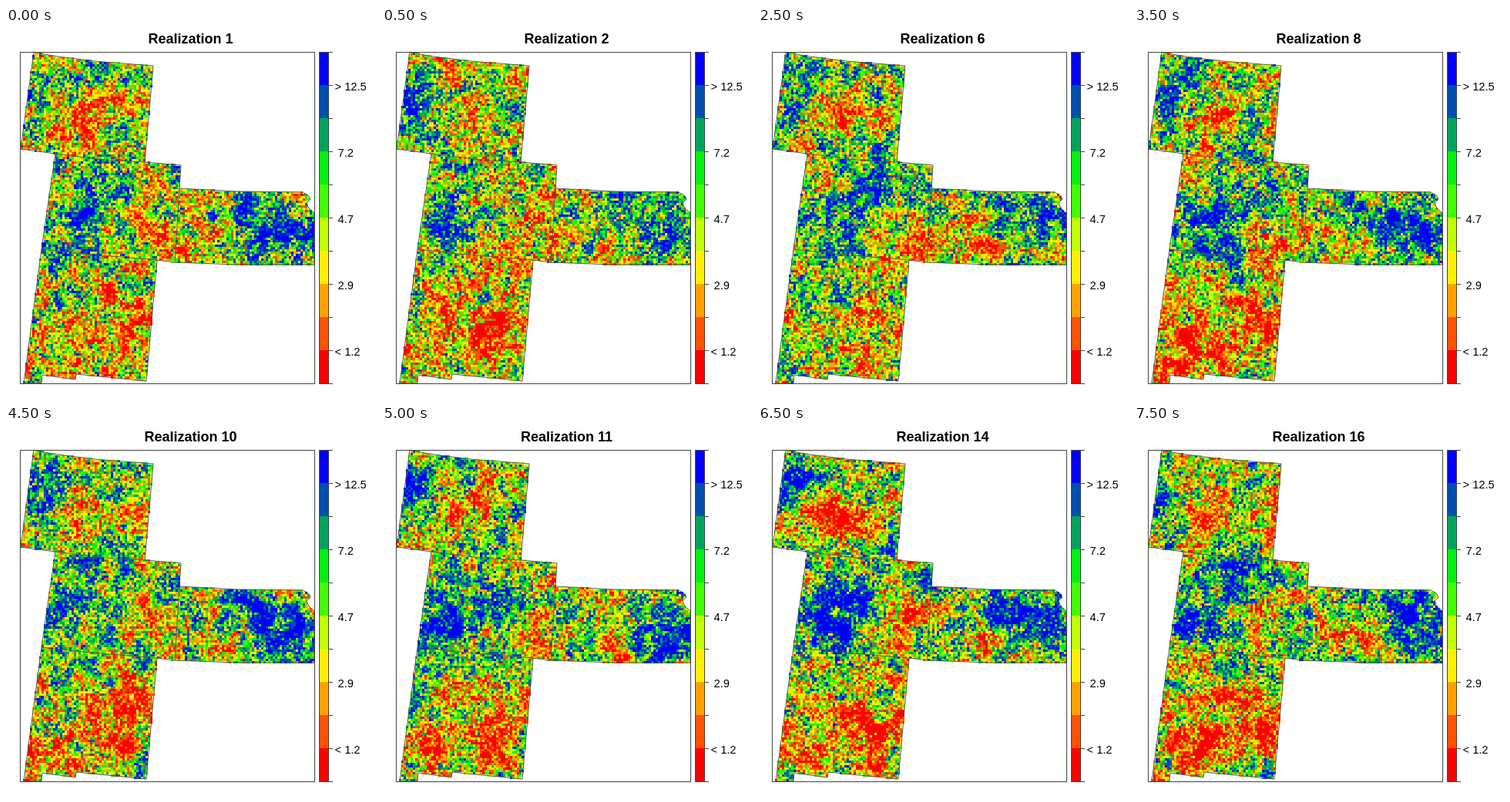
Recreate the animation shown at these times as an HTML page with a canvas. Size 480 by 480 pixels, loop 8 s.

```html
<!DOCTYPE html>
<html lang="en">
<head>
<meta charset="utf-8">
<title>Realizations</title>
<style>
  html, body { margin: 0; width: 100%; height: 100%; overflow: hidden; background: #fff; }
  canvas, svg { position: absolute; left: 0; top: 0; width: 480px; height: 480px; }
  text { font-family: "Liberation Sans", Arial, sans-serif; font-size: 14.67px; fill: #000; }
  #title { font-size: 18px; font-weight: bold; text-anchor: middle; }
</style>
</head>
<body>
<canvas id="map" width="480" height="480"></canvas>
<svg viewBox="0 0 480 480">
  <g id="borders" fill="none" stroke="#555"></g>
  <rect x="18.5" y="31.5" width="382" height="430" fill="none" stroke="#444"/>
  <text id="title" x="239.5" y="20">Realization 1</text>
  <g id="legend"></g>
</svg>
<script>
const STEP = 500, COUNT = 16, CELL = 3, LEFT = 19, TOP = 32, BAND = 43;
const RAMP = ['#ff0000', '#ff5200', '#ffa200', '#fff000', '#bfff00',
              '#40ff00', '#00f010', '#00a35c', '#0050af', '#0000ff'];

const OUTLINE = 'M36 31L60 36L115 43L191 49L180 174L227 178L225 208L300 212L385 213' +
  'L393 218L395 222L390 227L393 234L400 240V307H300L219 304L196 301L182 458' +
  'L91 449L90 456L47 450L46 461H23L46 287L64 163L19 157Z';
const INNER = 'M64 163L127 171L180 174M46 287L100 293L196 301M225 208L219 304';

// Lasting hot and cold spots; each realization shifts and scales them
const SPOTS = [
  { x: 38, y: 82, r: 24, gain: 1.2 },
  { x: 107, y: 115, r: 21, gain: -1.4 },
  { x: 90, y: 255, r: 24, gain: 1.1 },
  { x: 125, y: 205, r: 28, gain: .7 },
  { x: 192, y: 260, r: 24, gain: -.7 },
  { x: 362, y: 260, r: 30, gain: 1.3 },
  { x: 310, y: 228, r: 20, gain: .7 },
  { x: 292, y: 288, r: 15, gain: -.9 },
  { x: 155, y: 390, r: 32, gain: -1.1 },
  { x: 70, y: 415, r: 40, gain: -.9 }
];

const ctx = document.getElementById('map').getContext('2d');
const title = document.getElementById('title');
const region = new Path2D(OUTLINE);
const cells = [];

for (let y = TOP; y < 461; y += CELL)
  for (let x = LEFT; x < 400; x += CELL)
    if (ctx.isPointInPath(region, x + 1.5, y + 1.5)) cells.push([x, y]);

// Repeatable random number in -1..1
function rand(x, y, seed) {
  let h = Math.imul(x, 374761393) ^ Math.imul(y, 668265263) ^ Math.imul(seed, 1442695041);
  h = Math.imul(h ^ (h >>> 13), 1274126177);
  h = Math.imul(h ^ (h >>> 16), 2246822519);
  return ((h ^ (h >>> 15)) >>> 0) / 2147483648 - 1;
}

function smoothNoise(x, y, size, seed) {
  const gx = x / size, gy = y / size, ix = Math.floor(gx), iy = Math.floor(gy);
  const ease = t => t * t * (3 - 2 * t), mix = (a, b, t) => a + (b - a) * t;
  const u = ease(gx - ix), v = ease(gy - iy);
  const row = j => mix(rand(ix, j, seed), rand(ix + 1, j, seed), u);
  return mix(row(iy), row(iy + 1), v);
}

function spotsFor(k) {
  return SPOTS.map((s, i) => ({
    x: s.x + 7 * rand(i, 1, k),
    y: s.y + 7 * rand(i, 2, k),
    r: s.r,
    gain: s.gain * (1 + .35 * rand(i, 3, k))
  }));
}

function value(x, y, k, spots) {
  const seed = k * 10;
  let v = .9 * smoothNoise(x, y, 9, seed + 1) + .9 * smoothNoise(x, y, 22, seed + 2);
  for (let i = 3; i < 6; i++) v += .62 * rand(x, y, seed + i);
  for (const s of spots)
    v += s.gain * Math.exp(-((x - s.x) ** 2 + (y - s.y) ** 2) / (2 * s.r * s.r));
  return v;
}

function paint(k) {
  const spots = spotsFor(k);
  ctx.clearRect(0, 0, 480, 480);
  for (const [x, y] of cells) {
    const p = 1 / (1 + Math.exp(-1.7 * value(x, y, k, spots)));
    ctx.fillStyle = RAMP[Math.min(9, Math.floor(p * 10))];
    ctx.fillRect(x, y, CELL, CELL);
  }
  title.textContent = 'Realization ' + k;
}

function buildStatics() {
  let out = '';
  RAMP.forEach((color, i) => {
    out += `<rect x="406" y="${418 - i * BAND}" width="13" height="${BAND}" fill="${color}"/>`;
  });
  out += '<rect x="406.5" y="31.5" width="12" height="430" fill="none" stroke="#444"/>';
  for (let i = 0; i <= RAMP.length; i++)
    out += `<path d="M418 ${31.5 + i * BAND}h6" stroke="#444"/>`;
  ['&gt; 12.5', '7.2', '4.7', '2.9', '&lt; 1.2'].forEach((label, i) => {
    out += `<text x="${label[0] === '&' ? 426.5 : 430.5}" y="${81 + i * 2 * BAND}">${label}</text>`;
  });
  document.getElementById('legend').innerHTML = out;
  document.getElementById('borders').innerHTML = `<path d="${OUTLINE}"/><path d="${INNER}"/>`;
}

let shown = 0;
const start = performance.now();
function tick() {
  const t = Math.max(0, performance.now() - start);
  const k = Math.floor(t / STEP) % COUNT + 1;
  if (k !== shown) paint(shown = k);
  requestAnimationFrame(tick);
}

buildStatics();
tick();
</script>
</body>
</html>
```
